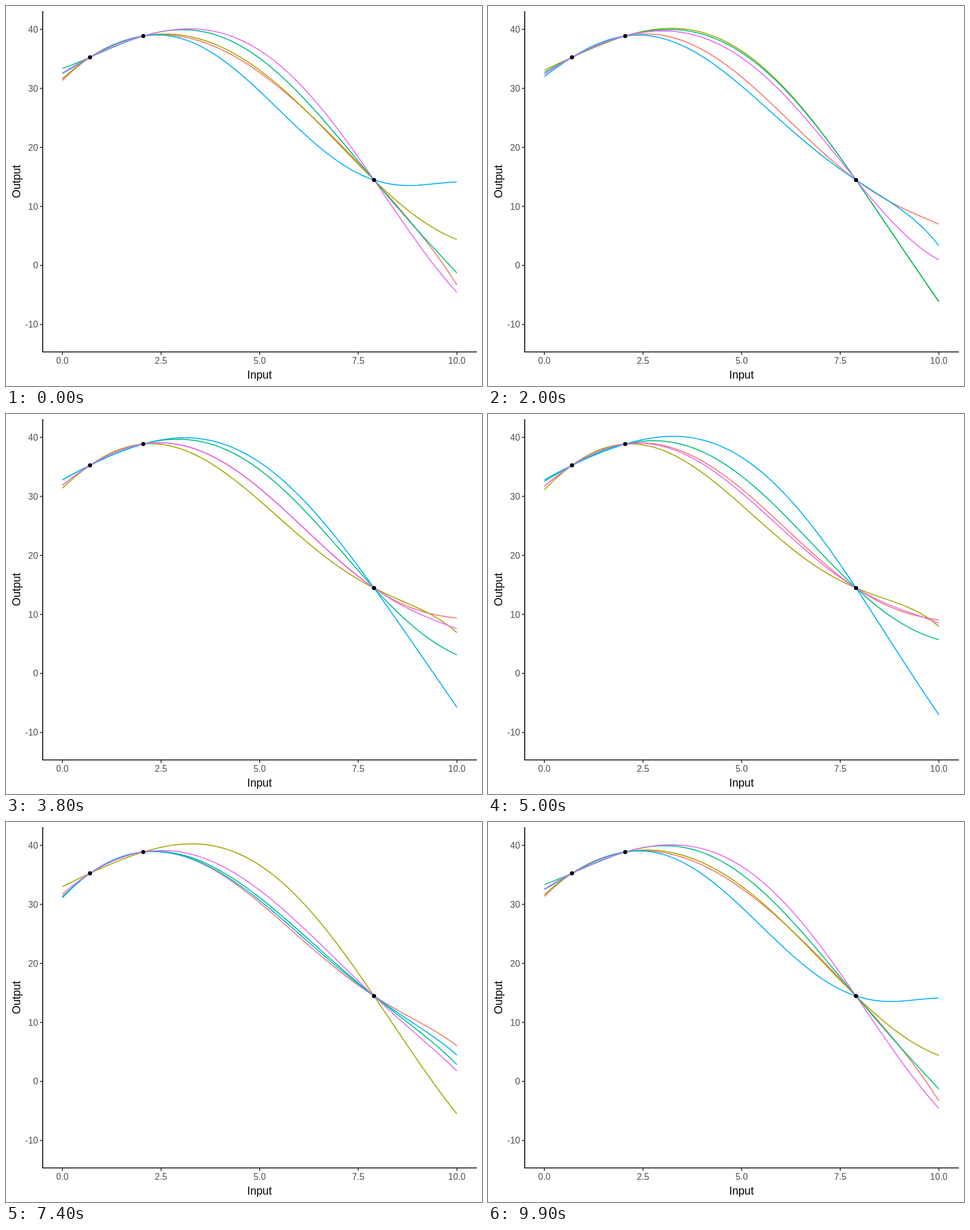
An HTML page that plays this animation: 837 px wide and 669 px high, repeating every 10 s.

```html
<!DOCTYPE html>
<html lang="en">
<head>
<meta charset="utf-8">
<title>Curves through three points</title>
<style>
  html, body { margin: 0; width: 100%; height: 100%; overflow: hidden; background: #fff; }
  svg { display: block; width: 837px; height: 669px; font-family: "Liberation Sans", Arial, sans-serif; }
  .axis { fill: none; stroke: #000; stroke-width: 1.7; }
  .tick { stroke: #333; stroke-width: 1.7; }
  .label { font-size: 15.6px; fill: #4d4d4d; }
  .title { font-size: 19.5px; text-anchor: middle; }
  .curve { fill: none; stroke-width: 1.75; stroke-linejoin: round; }
</style>
</head>
<body>
<svg viewBox="0 0 837 669">
  <g id="curves"></g>
  <g id="dots"></g>
  <path class="axis" d="M64.5 9V609H828"/>
  <g id="ticks"></g>
  <text class="title" x="445.7" y="656">Input</text>
  <text class="title" transform="translate(25.3 309) rotate(-90)">Output</text>
</svg>
<script>
const DOTS = [[0.7, 90.3], [2.05, 52.8], [7.9, 306.3]];
const BEND = 0.0018; // shared sixth-degree bend that vanishes at every knot
const FRAME = 100, FRAMES = 100, STEPS = 10;

// Each curve is set by its height in px at the left end, middle and right end, one triple per state
const ENDS = [0, 5, 10];
const CURVES = {
  '#F8766D': [[131, 117, 491], [120, 125, 384], [127, 132, 353], [129, 131, 450], [133, 153, 338]],
  '#A3A500': [[128, 113, 411], [113, 79, 521], [135, 171, 351], [117, 65, 581], [111, 87, 447]],
  '#00BF7D': [[110, 92, 470], [117, 82, 520], [116, 102, 400], [143, 176, 373], [121, 90, 481]],
  '#00B0F6': [[119, 150, 310], [124, 141, 422], [114, 71, 540], [135, 123, 434], [132, 153, 386]],
  '#E76BF3': [[118, 78, 504], [120, 91, 447], [127, 141, 361], [126, 121, 433], [128, 119, 443]]
};
const STATES = 5;

const px = x => 99.2 + 69.36 * x;
const py = y => 456.7 - 10.39 * y;
const range = (n, f) => Array.from({ length: n }, (_, i) => f(i));

function add(parent, tag, attrs, text = '') {
  const el = document.createElementNS('http://www.w3.org/2000/svg', tag);
  for (const key in attrs) el.setAttribute(key, attrs[key]);
  el.textContent = text;
  return document.getElementById(parent).appendChild(el);
}

for (let x = 0; x <= 10; x += 2.5) {
  add('ticks', 'path', { class: 'tick', d: `M${px(x)} 609.8v4.4` });
  add('ticks', 'text', { class: 'label', x: px(x), y: 630.4, 'text-anchor': 'middle' }, x.toFixed(1));
}
for (let y = -10; y <= 40; y += 10) {
  add('ticks', 'path', { class: 'tick', d: `M59.8 ${py(y)}h4` });
  add('ticks', 'text', { class: 'label', x: 56.4, y: py(y) + 5.7, 'text-anchor': 'end' }, y);
}
for (const [x, y] of DOTS) add('dots', 'circle', { cx: px(x), cy: y, r: 3.6 });

const curves = Object.entries(CURVES).map(([stroke, states]) =>
  ({ states, path: add('curves', 'path', { class: 'curve', stroke }) }));

// Polynomial through all knots, plus the shared bend
function height(x, knots) {
  let y = BEND * knots.reduce((p, [k]) => p * (x - k), 1);
  for (const [k, h] of knots) {
    y += knots.reduce((p, [m]) => m === k ? p : p * (x - m) / (k - m), h);
  }
  return y;
}

function outline(heights) {
  const knots = [...DOTS, ...ENDS.map((x, i) => [x, heights[i]])];
  return 'M' + range(61, i => {
    const x = i / 6;
    return px(x).toFixed(2) + ' ' + height(x, knots).toFixed(2);
  }).join('L');
}

// Hold each state, then blend linearly into the next one
function pose(frame) {
  let state = 0, mix = 0;
  for (let i = 0; i < STATES; i++) {
    const start = Math.round(10.8 + 19.8 * i);
    if (frame < start) break;
    state = i;
    mix = Math.min(1, (frame - start + 1) / STEPS);
  }
  for (const { states, path } of curves) {
    const to = states[(state + 1) % STATES];
    path.setAttribute('d', outline(states[state].map((y, i) => y + (to[i] - y) * mix)));
  }
}

let shown = -1;
function tick() {
  const frame = Math.floor(performance.now() / FRAME) % FRAMES;
  if (frame !== shown) pose(shown = frame);
  requestAnimationFrame(tick);
}
tick();
</script>
</body>
</html>
```
